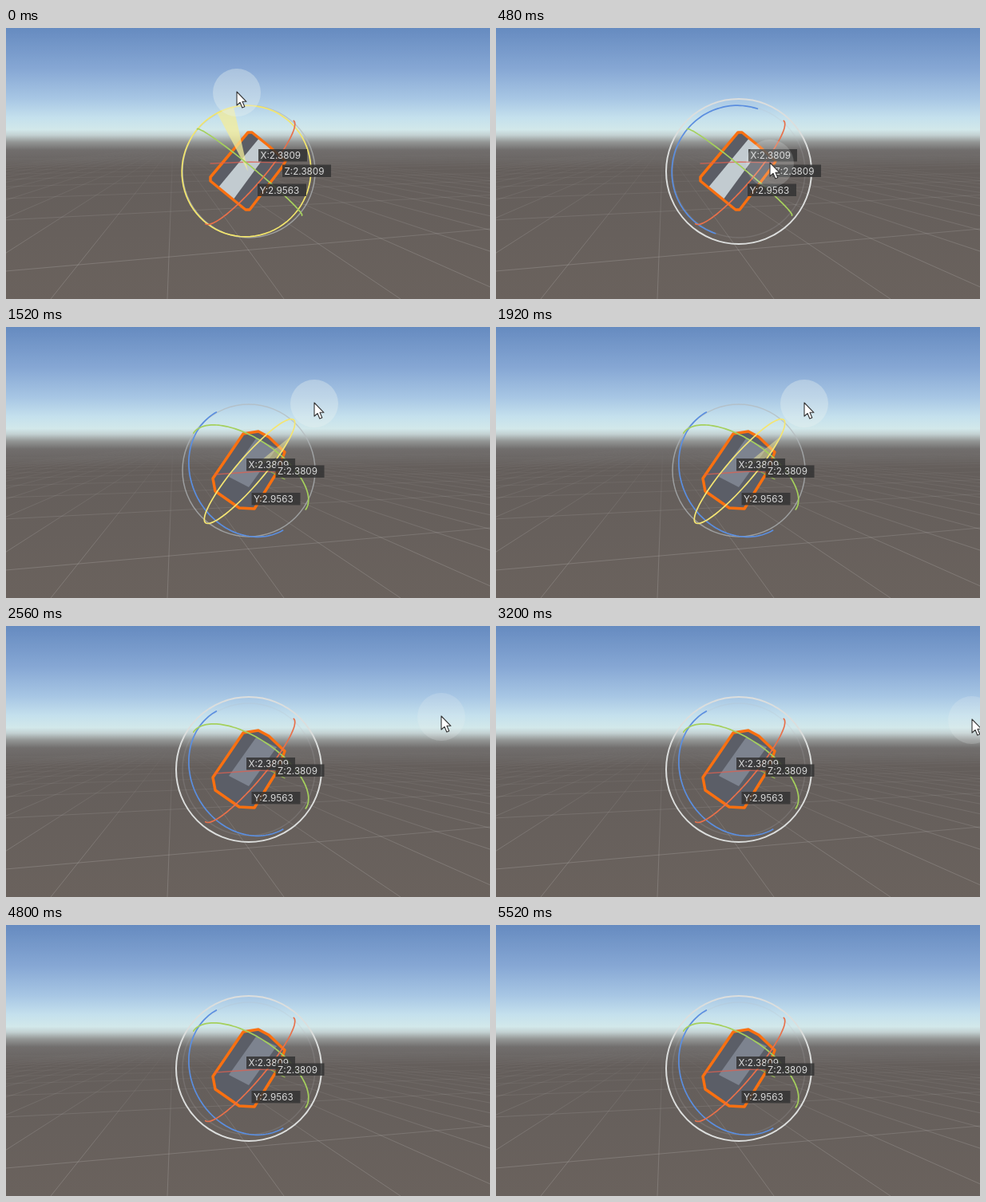
These frames come from a looping animation (606x340 px, 5.6 s). An HTML page:

```html
<!DOCTYPE html>
<html lang="en">
<head>
<meta charset="utf-8">
<title>Rotation gizmo</title>
<style>
html, body { margin: 0; width: 100%; height: 100%; overflow: hidden; background: #665f5b; }
svg { display: block; width: 606px; height: 340px; }
text { font: 11.7px Inter, Roboto, sans-serif; fill: #dcdcdc; }
.line { fill: none; stroke-width: 1.7; stroke-linecap: round; }
</style>
</head>
<body>
<svg id="stage" viewBox="0 0 606 340">
  <defs>
    <linearGradient id="sky" x1="0" y1="0" x2="0" y2="1">
      <stop offset="0" stop-color="#668bc0"/>
      <stop offset=".15" stop-color="#86a7d4"/>
      <stop offset=".26" stop-color="#a7c6e4"/>
      <stop offset=".33" stop-color="#c4e0ed"/>
      <stop offset=".375" stop-color="#d2e8ea"/>
      <stop offset=".395" stop-color="#c3d1d2"/>
      <stop offset=".42" stop-color="#959897"/>
      <stop offset=".45" stop-color="#716e6d"/>
      <stop offset=".52" stop-color="#645e5b"/>
      <stop offset="1" stop-color="#6a625d"/>
    </linearGradient>
    <linearGradient id="fade" gradientUnits="userSpaceOnUse" x1="0" y1="150" x2="0" y2="280">
      <stop offset="0" stop-color="#fff" stop-opacity="0"/>
      <stop offset="1" stop-color="#fff" stop-opacity=".15"/>
    </linearGradient>
    <clipPath id="hull"><path id="hullClip"/></clipPath>
  </defs>
  <rect width="606" height="340" fill="url(#sky)"/>
  <path id="grid" fill="none" stroke="url(#fade)" stroke-width="1"/>
  <path id="body"/>
  <path id="face" clip-path="url(#hull)"/>
  <path id="edge" fill="none" stroke="#fa7010" stroke-width="3.5" stroke-linejoin="round"/>
  <circle id="ball" cx="304" cy="180" r="83" fill="none" stroke="#b4b9bc" stroke-width="1.5"/>
  <path id="stem" class="line" stroke="#dd6050" stroke-opacity=".75" style="stroke-width:1.3"/>
  <path id="twig" class="line" stroke="#8db24e" style="stroke-width:1.3"/>
  <path id="wedge" fill="#f3ec9a"/>
  <path id="ringZ" class="line"/>
  <path id="ringY" class="line"/>
  <path id="ringX" class="line"/>
  <circle id="view" cx="304" cy="180" r="91" fill="none" stroke="#dcdedd" stroke-width="2"/>
  <g id="labels"></g>
  <g id="mouse">
    <circle id="halo" r="30" cy="1" fill="#e9f1ee"/>
    <path d="M0 0V17L4 13.3L6.8 20L9.8 18.7L7 12.3H12Z" fill="#fff" stroke="#333" stroke-width="1.1" stroke-linejoin="round"/>
  </g>
</svg>
<script>
const $ = id => document.getElementById(id);
const set = (id, attrs) => { for (const k in attrs) $(id).setAttribute(k, attrs[k]); };
const mix = (a, b, f) => a + (b - a) * f;
const mixAll = (a, b, f) => a.map((v, i) => mix(v, b[i], f));
const clamp = v => Math.max(0, Math.min(1, v));

const LOOP = 5600, STEP = 80;
const Z_END = 160, X_START = 520, X_END = 2080, GONE = 4080;

// time, x, y
const track = [
  [0, 289, 80], [160, 289, 81], [440, 343, 169], [520, 343, 169],
  [640, 540, 110], [720, 540, 110], [1120, 400, 100], [1280, 386, 95],
  [2080, 386, 95], [2560, 545, 113], [2960, 596, 117],
  [3840, 596, 117], [GONE, 640, -40]
];

// each shape before and after the X turn
const outline = [
  [303,131, 308,131, 329,148, 350,167, 346,174, 305,228, 300,228, 256,192, 256,187],
  [297,134, 316,131, 329,138, 349,157, 340,181, 311,228, 292,227, 262,206, 259,190]
];
const panel = [
  [318,137, 333,149, 284,216, 265,201],
  [313,140, 339,152, 304,201, 279,188]
];
const stem = [[256,170, 305,168, 348,169], [262,185, 318,181, 336,182]];
const tags = [
  { text: "X:2.3809", at: [[316, 152], [301, 165]] },
  { text: "Y:2.9563", at: [[315, 195.5], [307.5, 208]] },
  { text: "Z:2.3809", at: [[346, 171.5], [337.5, 173.5]] }
];

const mainX = [.745, .637, -.2], up = [.65, -.76, 0], front = [.152, .13, .98];
const blend = (a, b, t) => a.map((v, i) => v * Math.cos(t) + b[i] * Math.sin(t));
const points = (list, close) => {
  let d = "M";
  for (let i = 0; i < list.length; i += 2)
    d += (i ? "L" : "") + list[i].toFixed(1) + " " + list[i + 1].toFixed(1);
  return d + (close ? "Z" : "");
};

// the ring spanned by a and b, either whole or only the half nearest the eye
function ring(a, b, whole, cx = 305, cy = 181, r = 85) {
  const mid = Math.atan2(b[2], a[2]), span = whole ? Math.PI : Math.PI / 2;
  const list = [];
  for (let i = -40; i <= 40; i++) {
    const p = blend(a, b, mid + span * i / 40);
    list.push(cx + r * p[0], cy + r * p[1]);
  }
  return points(list, whole);
}

function buildGrid() {
  let d = "";
  for (let k = 0; k < 14; k++)
    d += `M0 ${148 + 1 / (.00637 + .0044 * k)}L1796 148`;
  for (let k = -12; k <= 12; k++)
    d += `M209 148L${348 + 146 * k} 340`;
  $("grid").setAttribute("d", d);
}

function buildLabels() {
  $("labels").innerHTML = tags.map((t, i) =>
    `<g id="tag${i}"><rect width="61" height="15.5" fill="#343434" fill-opacity=".86"/>` +
    `<text x="2.5" y="12">${t.text}</text></g>`).join("");
}

function pointer(t) {
  let i = 0;
  while (i < track.length - 2 && t >= track[i + 1][0]) i++;
  const a = track[i], b = track[i + 1];
  return mixAll(a, b, clamp((t - a[0]) / (b[0] - a[0]))).slice(1);
}

function turn(t, x, y) {
  if (t < X_START) return 0;
  if (t >= X_END) return 1;
  return ((x - 343) * .4 + (169 - y) * .9) / 84;
}

function draw(t) {
  const [x, y] = pointer(t);
  const dragZ = t < Z_END, dragX = t >= X_START && t < X_END, held = dragZ || dragX;
  const f = turn(t, x, y), c = clamp(f), phi = .08 + .42 * f;

  const hull = points(mixAll(...outline, f), true);
  for (const id of ["hullClip", "body", "edge"]) $(id).setAttribute("d", hull);
  set("body", { fill: `rgb(${mixAll([91, 93, 101], [91, 94, 103], c)})` });
  set("face", {
    d: points(mixAll(...panel, f), true),
    fill: `rgb(${mixAll([194, 203, 208], [125, 131, 143], c)})`
  });
  set("stem", { d: points(mixAll(...stem, f)) });
  set("twig", { d: "M332 182L349 191", opacity: c });

  const axisZ = blend(front, up, phi);
  const axisY = blend(up, front.map(v => -v), phi);
  const drift = 1 - c;
  set("ringZ", {
    d: ring(mainX, axisY, dragZ, 305 - 4 * drift, 181 - 1.5 * drift, 85 - 2.5 * drift),
    stroke: dragZ ? "#f3e66c" : "#5a8ee0"
  });
  set("ringY", { d: ring(mainX, axisZ, false), stroke: "#a5d05c" });
  set("ringX", { d: ring(up, front, dragX), stroke: dragX ? "#f4e573" : "#e8704a" });

  let fan = "";
  if (dragZ) fan = "M303 180L264 106Q274 101 285 99Z";
  if (dragX) {
    const list = [304, 180];
    for (let i = 0; i <= 10; i++) {
      const p = blend(up, front, 1.12 - .45 * f * i / 10);
      list.push(305 + 85 * p[0], 181 + 85 * p[1]);
    }
    fan = points(list, true);
  }
  set("wedge", { d: fan, "fill-opacity": dragZ ? .75 : .5 });
  set("ball", { opacity: held ? .7 : .18 });
  set("view", { opacity: held ? 0 : 1 });

  tags.forEach((tag, i) => {
    const [px, py] = mixAll(...tag.at, f);
    set("tag" + i, { transform: `translate(${px} ${py})` });
  });
  set("mouse", {
    transform: `translate(${x} ${y})`,
    visibility: t < GONE ? "visible" : "hidden"
  });
  set("halo", { opacity: held ? .36 : .2 });
}

buildGrid();
buildLabels();
const begin = performance.now();
function tick() {
  const t = (performance.now() - begin) % LOOP;
  draw(Math.floor(t / STEP) * STEP);
  requestAnimationFrame(tick);
}
tick();
</script>
</body>
</html>
```
